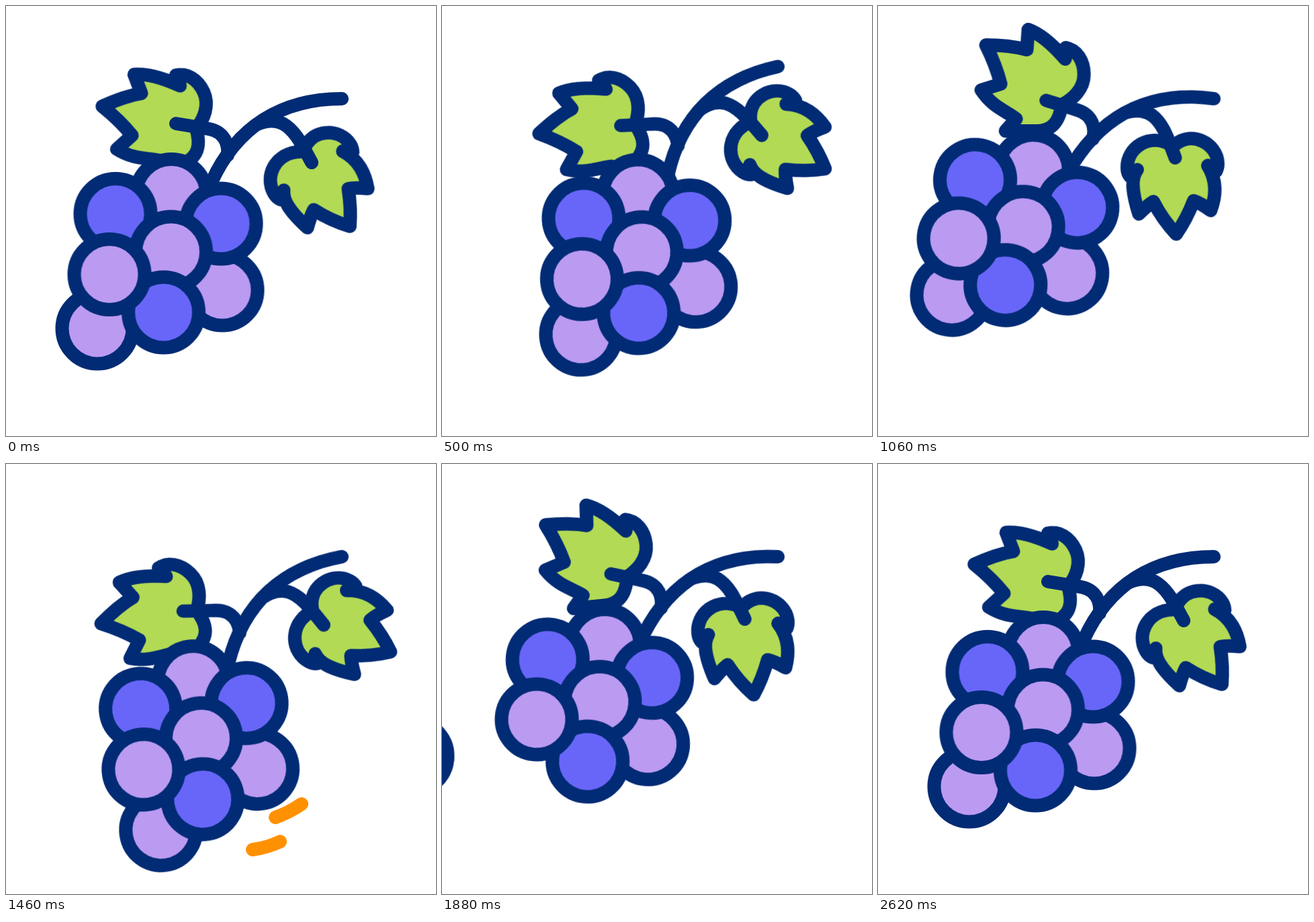
Recreate the animation shown at these times as an HTML page. Size 640 px wide and 640 px high, loop 3000 ms.

```html
<!DOCTYPE html>
<html lang="en">
<head>
<meta charset="utf-8">
<title>Swinging grapes</title>
<style>
  html, body { margin: 0; width: 100%; height: 100%; overflow: hidden; background: #fff; }
  svg { display: block; width: 100%; height: 100%; }

  .ink { stroke: #022b75; stroke-width: 20; stroke-linecap: round; stroke-linejoin: round; fill: none; }
  .leaf { fill: #b2da54; }
  .pink { fill: #bb9af2; }
  .blue { fill: #6866f8; }
  .swish { fill: none; stroke: #ff9100; stroke-width: 20; stroke-linecap: round; stroke-dasharray: 1 4; }

  .lift, .swing, .twist, .flutter, .loose, .swish {
    animation: 3s cubic-bezier(.37, 0, .63, 1) infinite;
  }
  .lift { animation-name: lift; }
  .swing { animation-name: swing; transform-origin: 500px 138px; }
  .twist { animation-name: twist; transform-origin: 246px 355px; }
  .loose { animation-name: loose; }
  .swish { animation-name: swish; }

  /* Each leaf beats between its own raised and lowered pose. */
  .flutter { animation-name: flutter; }
  .left {
    transform-origin: 253px 175px;
    --up: translate(-2.5px, -13px) rotate(17deg);
    --down: translate(-11px, 1px) rotate(-11deg);
  }
  .right {
    transform-origin: 455px 233px;
    --up: translate(.5px, 3px) rotate(22.5deg);
    --down: translate(5px, -13px) rotate(-20deg);
  }

  @keyframes lift {
    0%, 8% { transform: translateY(0); }
    17% { transform: translateY(-48px); }
    34%, 100% { transform: translateY(0); }
  }
  @keyframes swing {
    0%, .6% { transform: rotate(0deg); }
    8% { transform: rotate(9deg); }
    20% { transform: rotate(-16.5deg); }
    33.9% { transform: rotate(8.6deg); }
    46.3% { transform: rotate(-11.5deg); }
    59.7% { transform: rotate(3deg); }
    72.7%, 100% { transform: rotate(0deg); }
  }
  @keyframes twist {
    0% { transform: rotate(0deg); }
    8% { transform: rotate(.5deg); }
    17% { transform: rotate(8deg); }
    35%, 72.7% { transform: rotate(2deg); }
    87%, 100% { transform: rotate(0deg); }
  }
  @keyframes flutter {
    0%, .6% { transform: translate(0, 0) rotate(0deg); }
    8%, 34.7%, 61.7% { transform: var(--up); }
    19.7%, 48%, 72.7% { transform: var(--down); }
    87%, 100% { transform: translate(0, 0) rotate(0deg); }
  }
  @keyframes loose {
    0%, 8% { transform: translate(-109.5px, 114px) scale(1); animation-timing-function: ease-out; }
    35% { transform: translate(-87px, 118px) scale(1); }
    48.7% { transform: translate(-79px, 126.6px) scale(1); animation-timing-function: ease-in; }
    62.7% { transform: translate(-271.5px, 103px) scale(1); animation-timing-function: linear; }
    67% { transform: translate(-350px, 90px) scale(1); animation-timing-function: step-end; }
    67.1%, 74% { transform: translate(-109.5px, 114px) scale(0); animation-timing-function: ease-out; }
    86%, 100% { transform: translate(-109.5px, 114px) scale(1); }
  }
  @keyframes swish {
    0%, 45% { stroke-dashoffset: 1.5; visibility: hidden; }
    45.1% { stroke-dashoffset: 1; visibility: visible; }
    48%, 49.3% { stroke-dashoffset: 0; visibility: visible; }
    52.3% { stroke-dashoffset: -1; visibility: visible; }
    52.4%, 100% { stroke-dashoffset: -1.5; visibility: hidden; }
  }
</style>
</head>
<body>
<svg viewBox="0 0 640 640">
  <defs><circle id="grape" r="52.5"/></defs>
  <g class="lift"><g class="swing">
    <g class="flutter left">
      <path class="ink leaf" transform="translate(260.2 185.5) rotate(-24.8)"
        d="M22 7C38 -1 55 -16 55 -38C55 -59 44 -75 28 -78L27 -61Q-3 -96 -28 -105L-30 -75
        Q-57 -82 -91 -82Q-76 -52 -69 -24L-98 -15C-80 12 -62 15 -46 28L-62 46L-16 46C8 46 18 32 22 7Z"/>
    </g>
    <g class="flutter right">
      <path class="ink leaf" transform="translate(453.4 230) rotate(-31.3)"
        d="M-6 -19C-38 -38 -72 -16 -72 14Q-72 22 -68 27L-57 17C-69 31 -63 59 -56 83
        Q-45 72 -34 65Q-21 92 -1 114Q15 92 26 65Q37 69 51 80C59 60 62 36 48 13
        L60 22Q63 17 63 10C63 -20 24 -40 0 -19Z"/>
    </g>
    <g class="ink">
      <path d="M500 138C410 138 343 180 306 262"/>
      <path d="M253 175L296 182C318 184 332 198 330 222"/>
      <path d="M374 176Q396 167 412 175C432 186 442 210 455 233"/>
    </g>
    <g class="twist"><g transform="translate(245.5 366)">
      <use href="#grape" class="ink pink loose"/>
      <use href="#grape" class="ink pink" x=".5" y="-85.5"/>
      <use href="#grape" class="ink pink" x="76.5" y="57"/>
      <use href="#grape" class="ink blue" x="-82.5" y="-56.5"/>
      <use href="#grape" class="ink blue" x="74.5" y="-42"/>
      <use href="#grape" class="ink pink"/>
      <use href="#grape" class="ink blue" x="-11" y="90"/>
      <use href="#grape" class="ink pink" x="-91.5" y="33.5"/>
    </g></g>
  </g></g>
  <path class="swish" pathLength="1" d="M401 526Q421 519 440 506"/>
  <path class="swish" pathLength="1" d="M367 574Q389 571 408 562"/>
</svg>
</body>
</html>
```
